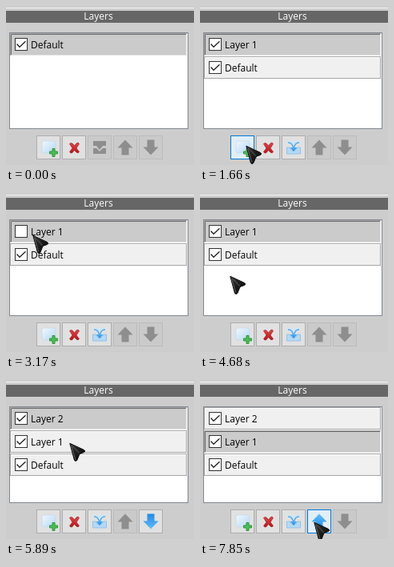
These frames come from a looping animation (235x199 px, 8 s). An HTML page:

```html
<!DOCTYPE html>
<html lang="en">
<head>
<meta charset="utf-8">
<title>Layers panel</title>
<style>
  html, body { margin: 0; width: 100%; height: 100%; overflow: hidden; background: #cdcdcd; }
  svg { display: block; width: 235px; height: 199px; }
  text { font: 12px "Open Sans", "Noto Sans", sans-serif; fill: #000; }
  .title { fill: #fff; text-anchor: middle; }
  .face { fill: #f0f0f0; }
  .etched, .sunken { fill: none; }
  .light { stroke: #fff; }
  .gray { stroke: #a5a5a5; }
  .dark { stroke: #6e6e6e; }
  .soft { stroke: #e3e3e3; }
  .sunken, .selected .etched { display: none; }
  .selected .sunken { display: inline; }
  .selected .face { fill: #cbcbcb; }
  .box { fill: #fff; stroke: #333; }
  .tick { fill: none; stroke: #222; stroke-width: 1.3; }
  .frame { fill: #e1e1e1; stroke: #adadad; }
  .off .frame { fill: #cacaca; stroke: #bcbcbc; }
  .hover .frame { fill: #e0eefa; stroke: #0078d7; }
  .off .on-art, .off-art { display: none; }
  .off .off-art { display: inline; }
  .off-art { fill: #8e8e8e; }
</style>
</head>
<body>
<svg viewBox="0 0 235 199">
  <defs>
    <linearGradient id="page" x2="1" y2="1">
      <stop stop-color="#f1f8fe"/><stop offset="1" stop-color="#b5d8f4"/>
    </linearGradient>
    <linearGradient id="blue" x2="0" y2="1">
      <stop stop-color="#62bcf9"/><stop offset="1" stop-color="#2389e2"/>
    </linearGradient>
    <linearGradient id="red" x2="0" y2="1">
      <stop stop-color="#e2474a"/><stop offset="1" stop-color="#b3141a"/>
    </linearGradient>
    <linearGradient id="shell" x2="1" y2="1">
      <stop stop-color="#3c3c3c"/><stop offset=".5" stop-color="#1c1c1c"/><stop offset="1" stop-color="#050505"/>
    </linearGradient>
    <path id="arrow" d="M0-9.500 9.500 .5H4.500V9.500H-4.500V.5H-9.500Z"/>
    <path id="merge" d="M-8-8H8V-2H4L0 3-4-2H-8ZM-8 1H-4L0 5 4 1H8V8H-8Z"/>
    <path id="cross" d="M-6-5Q-4-7-2-5L0-2.500 3-6Q5-7 6-5L2.500 .5 6 5Q5 7 3 6L0 3-3 6.500Q-5 7-6 5L-2.500 .5Z"/>
  </defs>

  <path d="M0 2.500H235" stroke="#f5f5f5"/>
  <rect y="6" width="235" height="15" fill="#666"/>
  <text class="title" x="115.5" y="17">Layers</text>
  <rect x="4.5" y="33.5" width="223" height="120" fill="#fff" stroke="#828790"/>

  <g id="rows"></g>
  <g id="buttons"></g>

  <g id="cursor">
    <path d="M.8 1.300 18.500 9.500Q21 11 18.500 12.500L14 14Q12.500 15 12 17L9.800 22.500Q8 24.500 6.500 22.500Z"
          fill="url(#shell)" stroke="#0a0a0a" stroke-linejoin="round"/>
    <path d="M2.500 4.500 7.800 21.500" stroke="#666" stroke-width=".9"/>
    <path d="M3 3.500 12.500 13.500" stroke="#484848" stroke-width="1.200"/>
  </g>
</svg>

<script>
const LOOP = 8000;
const $ = id => document.getElementById(id);

const icons = {
  add: `<rect x="-8" y="-8" width="17" height="15" rx="2.500" fill="url(#page)" stroke="#c0d8ec" stroke-width=".7"/>
    <path d="M5 1.500H8V5H11.500V8H8V11.500H5V8H1.500V5H5Z" fill="#4cbb55" stroke="#2f9a3d" stroke-linejoin="round"/>`,
  remove: `<use href="#cross" transform="translate(.5 .5)" fill="url(#red)" stroke="#a81820" stroke-width=".7"/>`,
  merge: `<path d="M-8.500 0H-5L-2 4H2L5 0H8.500V8H-8.500Z" fill="#b5d9f5" stroke="#86bce8" stroke-width=".8"/>
    <path d="M-8-8H8L5-4H-5Z" fill="#cfe6f8"/>
    <path d="M-7-6Q-2-6-1-1M7-6Q2-6 1-1" fill="none" stroke="#5aabe9" stroke-width="1.600"/>
    <path d="M-1.500-2H1.500V0H4.500L0 5-4.500 0H-1.500Z" fill="url(#blue)"/>`,
  up: `<use href="#arrow" fill="url(#blue)"/>`,
  down: `<use href="#arrow" fill="url(#blue)" transform="scale(1 -1)"/>`
};
const offArt = {
  merge: `<use href="#merge"/>`,
  up: `<use href="#arrow"/>`,
  down: `<use href="#arrow" transform="scale(1 -1)"/>`
};

const names = Object.keys(icons);
const buttonX = i => 38 + 32 * i;
$("buttons").innerHTML = names.map((name, i) => `
  <g transform="translate(${buttonX(i)} 162)">
    <rect class="frame" x=".5" y=".5" width="29" height="29"/>
    <g transform="translate(15 15)">
      <g class="on-art">${icons[name]}</g><g class="off-art">${offArt[name] || ""}</g>
    </g>
  </g>`).join("");

$("rows").innerHTML = [0, 1, 2].map(i => `
  <g transform="translate(5 ${34 + 29 * i})">
    <rect class="face" width="222" height="29"/>
    <g class="etched">
      <path class="light" d="M1.500 27V1.500H220M0 28.500H221.500V0"/>
      <rect class="gray" x=".5" y=".5" width="220" height="27"/>
    </g>
    <g class="sunken">
      <path class="soft" d="M1 27.500H220.500V1"/>
      <path class="light" d="M0 28.500H221.500V0"/>
      <path class="dark" d="M1.500 27V1.500H220"/>
      <path class="gray" d="M.5 28V.5H221"/>
    </g>
    <rect class="box" x="6.500" y="6.500" width="15" height="15"/>
    <path class="tick" d="M8.500 13.500 12 17.300 19.500 10.300"/>
    <text x="26" y="19"></text>
  </g>`).join("");

const rows = [...$("rows").children];
const buttons = [...$("buttons").children];

// Pointer strokes: start, end, samples, then a quadratic curve.
const moves = [
  [140, 290, 2, 179, 156, 179, 114, 179, 72],
  [600, 1500, 7, 168, 80, -20, 170, 57, 174],
  [1660, 2700, 8, 57, 174, 40, 4, 19, 47],
  [2860, 3170, 3, 19, 47, 26, 49, 33, 52],
  [3320, 3760, 4, 38, 72, 56, 128, 37, 103],
  [4680, 5450, 6, 37, 103, 35, 140, 52, 168],
  [5740, 5890, 2, 66, 118, 72, 98, 79, 78],
  [6510, 6650, 2, 78, 78, 78, 78, 78, 78],
  [6960, 7850, 7, 17, 78, 90, 120, 142, 177]
];

function pointer(t) {
  if (t < 140 || (t >= 6650 && t < 6960)) return null;
  const [start, end, count, ax, ay, bx, by, cx, cy] = moves.findLast(m => t >= m[0]);
  const last = count - 1;
  const k = Math.floor((t - start) / (end - start) * last + 1e-6);
  const u = Math.min(k, last) / last, v = 1 - u;
  const curve = (a, b, c) => v * v * a + 2 * u * v * b + u * u * c;
  return [Math.round(curve(ax, bx, cx)), Math.round(curve(ay, by, cy))];
}

function draw(t) {
  const extra = t < 1660 ? 0 : t < 5600 ? 1 : 2;
  const layers = ["Layer 2", "Layer 1", "Default"].slice(2 - extra);
  const selected = t < 6050 ? 0 : 1;
  const hiddenLayer = t >= 2860 && t < 4390;

  rows.forEach((row, i) => {
    row.style.display = i < layers.length ? "" : "none";
    row.classList.toggle("selected", i === selected);
    row.querySelector("text").textContent = layers[i] || "";
    row.querySelector(".tick").style.display = hiddenLayer && i === 0 ? "none" : "";
  });

  const enabled = {
    add: true,
    remove: true,
    merge: selected < layers.length - 1,
    up: selected > 0,
    down: selected < layers.length - 2
  };
  const tip = pointer(t);
  buttons.forEach((button, i) => {
    const on = enabled[names[i]];
    const inside = tip && tip[0] >= buttonX(i) && tip[0] < buttonX(i) + 30 && tip[1] >= 162 && tip[1] < 192;
    button.classList.toggle("off", !on);
    button.classList.toggle("hover", Boolean(on && inside));
  });

  $("cursor").style.display = tip ? "" : "none";
  if (tip) $("cursor").setAttribute("transform", `translate(${tip})`);
}

const origin = performance.now();
function tick() {
  draw((performance.now() - origin) % LOOP);
  requestAnimationFrame(tick);
}
draw(0);
requestAnimationFrame(tick);
</script>
</body>
</html>
```
